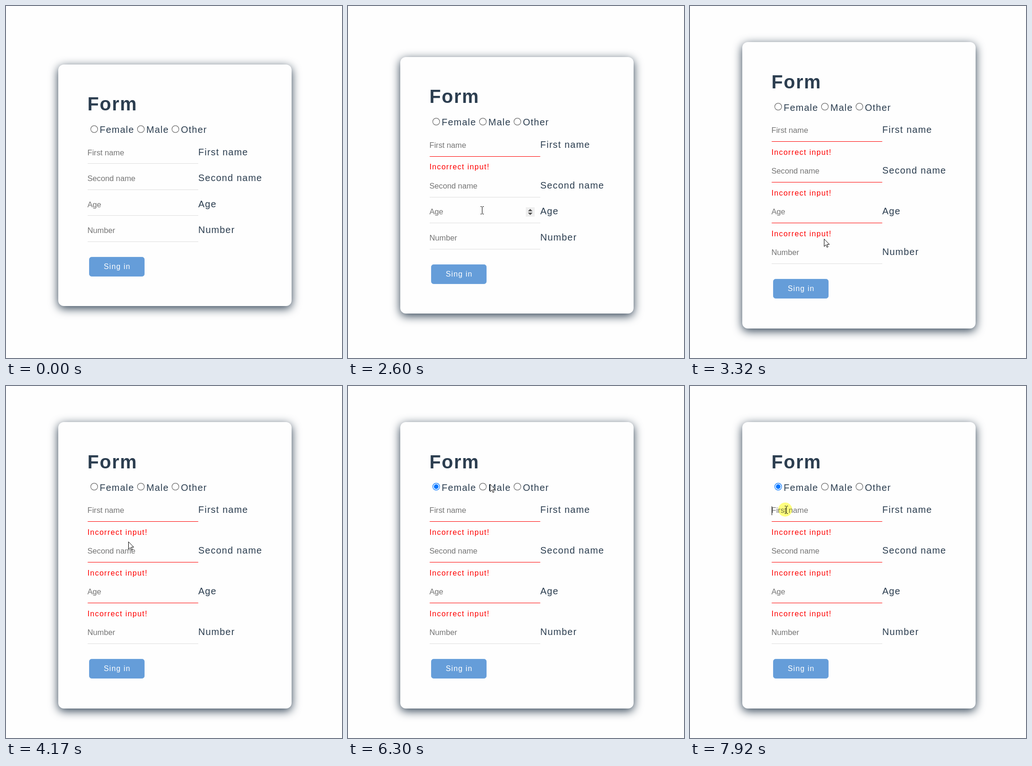
An HTML page that plays this animation: 720 by 752 pixels, repeating every 8 s.

```html
<!DOCTYPE html>
<html lang="en">
<head>
<meta charset="utf-8">
<title>Form</title>
<style>
html, body { margin: 0; width: 100%; height: 100%; overflow: hidden; background: #fefefe; }
svg { display: block; font-family: "Liberation Sans", Arial, sans-serif; fill: #2c3e50; }
.title { font-size: 40px; font-weight: bold; letter-spacing: 1.8px; }
.label { font-size: 20px; letter-spacing: 1.25px; }
.hint { font-size: 16.667px; fill: #757575; }
.error { font-size: 16.25px; letter-spacing: 1.35px; fill: #f00; }
.button { font-size: 16px; letter-spacing: 1.2px; fill: #fff; }
.glow { fill: #ffff80; mix-blend-mode: multiply; }
</style>
</head>
<body>
<svg id="stage" width="720" height="752" viewBox="0 0 720 752">
  <filter id="shadow" x="-20%" y="-20%" width="140%" height="140%" color-interpolation-filters="sRGB">
    <feDropShadow dx="0" dy="5" stdDeviation="10" flood-color="#2c3e50"/>
  </filter>
</svg>
<script>
const LOOP = 8000, PRESS = 70, REST = 170, BLINK = 500;
const ROW = 55.5, GROW = 31.5;
const FIELDS = ["First name", "Second name", "Age", "Number"];
const RADIOS = [["Female", 189], ["Male", 289], ["Other", 363]];
const START = { x: 549, y: 728 };

// The whole story: when the cursor sets off, when it clicks, and where
const clicks = [
  [300, 980, 290, 312], [1440, 1900, 286, 370], [2050, 2770, 285, 436],
  [2850, 3240, 287, 497], [3620, 4000, 262, 332], [4240, 4790, 216, 280],
  [5040, 5360, 191, 214], [5830, 6380, 304, 209], [6610, 6910, 282, 214],
  [7060, 7540, 192, 217], [7690, 7920, 204, 264]
].map(([leave, at, x, y]) => ({ leave, at, x, y }));

// The card stays centred while every error pushes the rows below it
const headY = (y, errors) => Math.round(y - errors * GROW / 2);
const rowY = (y, i, errors) => headY(y + i * ROW + Math.min(i, errors) * GROW, errors);

function fieldAt(x, y, errors) {
  return FIELDS.findIndex((_, i) => {
    const dy = y - rowY(318.6, i, errors);
    return x > 175 && x < 412 && dy >= -14 && dy <= 18;
  });
}

function radioAt(x, y, errors) {
  return RADIOS.findIndex(([, cx]) => Math.hypot(x - cx, y - headY(262.6, errors)) < 12);
}

// A field left empty turns into an error as soon as it loses focus
const idle = { at: 0, errors: 0, focus: -1, checked: -1 };
let state = idle;
for (const click of clicks) {
  const { x, y } = click;
  const radio = radioAt(x, y, state.errors);
  click.focus = fieldAt(x, y, state.errors);
  click.errors = Math.max(state.errors, state.focus + 1);
  click.checked = radio < 0 ? state.checked : radio;
  state = click;
}
const latest = t => clicks.filter(c => t >= c.at).pop() || idle;

function cursorAt(t) {
  let { x, y } = START;
  for (const c of clicks) {
    if (t < c.leave) break;
    const p = Math.min(1, (t - c.leave) / (c.at - REST - c.leave));
    x += (c.x - x) * p;
    y += (c.y - y) * p;
  }
  return [Math.round(x), Math.round(y)];
}

const stage = document.getElementById("stage");
const show = (el, on) => el.setAttribute("display", on ? "inline" : "none");
const place = (el, x, y) => el.setAttribute("transform", `translate(${x} ${y})`);

function add(tag, attrs, parent = stage, text = "") {
  const el = document.createElementNS("http://www.w3.org/2000/svg", tag);
  for (const key in attrs) el.setAttribute(key, attrs[key]);
  el.textContent = text;
  parent.append(el);
  return el;
}
const write = (cls, x, text, parent) => add("text", { class: cls, x }, parent, text);

const card = add("rect", { x: 112, width: 500, rx: 12, fill: "#fefefe", filter: "url(#shadow)" });
const title = write("title", 174.5, "Form");

const radios = RADIOS.map(([name, x]) => {
  const mark = add("g");
  const ring = add("circle", { cx: x, cy: 8, r: 7.4, fill: "#fff", "stroke-width": 1.2 }, mark);
  const dot = add("circle", { cx: x, cy: 8, r: 4.9, fill: "#0075ff" }, mark);
  return { mark, ring, dot, label: write("label", x + 11.75, name) };
});

const rows = FIELDS.map(name => ({
  hint: write("hint", 174.5, name),
  label: write("label", 412, name),
  line: add("rect", { x: 175, width: 237, height: 1 }),
  error: write("error", 174.5, "Incorrect input!")
}));

const spinner = add("g");
add("rect", { x: 381, y: -15, width: 19, height: 20, fill: "#efefef" }, spinner);
add("path", { d: "M385.5 -6.5L390.5 -11.5 395.5 -6.5ZM385.5 -3.5H395.5L390.5 1.5Z", fill: "#505050" }, spinner);

const button = add("g");
add("rect", {
  x: 178.5, y: 0.5, width: 118, height: 41, rx: 5, fill: "#659dd9", stroke: "#74a8df"
}, button);
write("button", 209.5, "Sing in", button).setAttribute("y", 26);

const caret = add("rect", { x: 175, width: 1, height: 19, fill: "#000" });
const glow = add("circle", { r: 15, class: "glow" });
const arrow = add("path", {
  d: "M.5 .8V16.8L4.2 13.3 6.5 18.6 8.9 17.6 6.6 12.3H11.7Z",
  fill: "#fff", stroke: "#000"
});
const beam = add("path", {
  d: "M-1 -7.5H1.5M3.5 -7.5H6M2.5 -7V8M-1 8.5H1.5M3.5 8.5H6",
  fill: "none", stroke: "#000"
});

function draw(t) {
  const pressed = latest(t), settled = latest(t - PRESS);
  const { errors, checked } = settled;
  const { focus } = pressed;
  const [x, y] = cursorAt(t);
  const over = fieldAt(x, y, errors);

  const top = headY(124.6, errors);
  card.setAttribute("y", top);
  card.setAttribute("height", headY(641.3, -errors) - top);
  title.setAttribute("y", headY(223, errors));
  place(button, 0, headY(536.2, -errors));

  radios.forEach(({ mark, ring, dot, label }, i) => {
    place(mark, 0, headY(254.6, errors));
    ring.setAttribute("stroke", i === checked ? "#0075ff" : "#6c6c6c");
    show(dot, i === checked);
    label.setAttribute("y", headY(270.8, errors));
  });

  rows.forEach(({ hint, label, line, error }, i) => {
    const base = rowY(318.6, i, errors);
    hint.setAttribute("y", base);
    label.setAttribute("y", base);
    line.setAttribute("y", rowY(336.3, i, errors));
    line.setAttribute("fill", i < errors ? "#f00" : "#dedede");
    error.setAttribute("y", rowY(364.8, i, errors));
    show(error, i < errors);
  });

  place(spinner, 0, rowY(318.6, 2, errors));
  show(spinner, over === 2 || focus === 2);
  caret.setAttribute("y", rowY(318.6, focus, errors) - 14);
  show(caret, focus >= 0 && (t - pressed.at) % (2 * BLINK) < BLINK);

  // The text cursor waits until the form has moved
  const typing = over >= 0 && pressed.errors === errors;
  [glow, arrow, beam].forEach(el => place(el, x, y));
  show(glow, pressed !== settled);
  show(arrow, t >= clicks[0].leave && !typing);
  show(beam, typing);
}

const began = performance.now();
function tick() {
  draw((performance.now() - began) % LOOP);
  requestAnimationFrame(tick);
}
tick();
</script>
</body>
</html>
```
